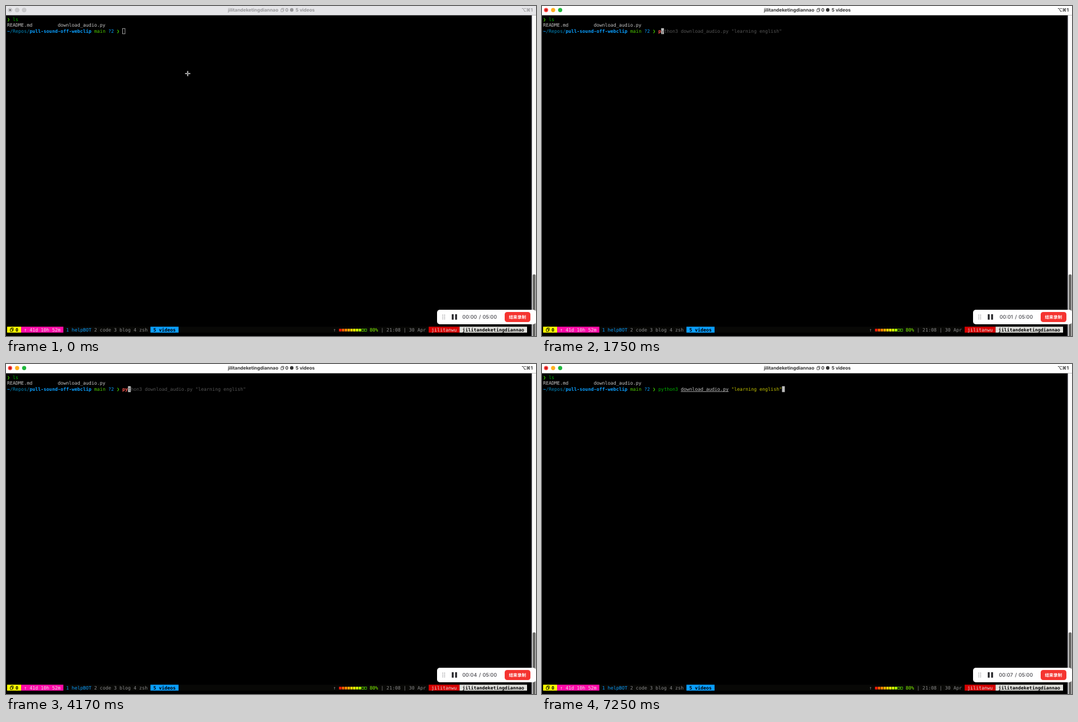
Write an HTML page that moves like this. It is 948 by 591 pixels and loops after 8 s.

```html
<!DOCTYPE html>
<html lang="en">
<head>
<meta charset="utf-8">
<title>Terminal recording</title>
<style>
  html, body { margin: 0; width: 100%; height: 100%; overflow: hidden; background: #000; }
  svg { display: block; width: 948px; height: 591px; }
  text { white-space: pre; text-rendering: geometricPrecision; }
  .mono { font: 8.35px "DejaVu Sans Mono", monospace; }
  .mono .bold { font-weight: 700; }
  .ui { font: 700 8.3px Inter, "DejaVu Sans", sans-serif; }
  .time { font: 500 9px Inter, sans-serif; fill: #46464c; }
  .cjk { font: 700 7.7px "Noto Sans CJK SC", "Noto Sans CJK", sans-serif; fill: #fff; }
</style>
</head>
<body>
<svg id="stage" viewBox="0 0 948 591"></svg>
<script>
const LOOP = 8000;
const LEFT = 2, TOP = 18.6, CELL_W = 5.027, CELL_H = 10.57;
const BAR_H = 16.6;
const STATUS_ROW = 52.58;
const HOST = "jilitandeketingdiannao";
const COMMAND = 'python3 download_audio.py "learning english"';
const PROMPT_COL = 41;
const BLUE = "#0a9fff", LIGHT = "#c7c7c7", GREY = "#8a8a8a", DIM = "#555", CURSOR = "#bbb";

const stage = document.getElementById("stage");

function add(parent, tag, attrs = {}, text) {
  const node = document.createElementNS("http://www.w3.org/2000/svg", tag);
  for (const key in attrs) node.setAttribute(key, attrs[key]);
  if (text !== undefined) node.textContent = text;
  parent.append(node);
  return node;
}
const group = (parent, attrs) => add(parent, "g", attrs);
const rect = (parent, x, y, width, height, fill, rx = 0) =>
  add(parent, "rect", { x, y, width, height, fill, rx });
const dot = (parent, cx, cy, r, fill) => add(parent, "circle", { cx, cy, r, fill });
const show = (node, on) => node.setAttribute("visibility", on ? "visible" : "hidden");

const colX = col => LEFT + col * CELL_W;
const rowY = row => TOP + row * CELL_H;

// Text on the terminal grid.
function run(parent, col, row, text, fill, bold = false) {
  return add(parent, "text", {
    x: colX(col), y: rowY(row) + 8.2, fill, class: bold ? "bold" : ""
  }, text);
}
function block(parent, col, row, cols, fill) {
  return rect(parent, colX(col), rowY(row), cols * CELL_W, CELL_H, fill);
}

function buildTitleBar(active) {
  const g = group(stage, { class: "ui" });
  const ink = active ? "#333" : "#98989a";
  const lights = active ? ["#ff3b38", "#ffb01f", "#1fb83c"] : ["#c9c9cb", "#c9c9cb", "#c9c9cb"];
  rect(g, 0, 0, 948, BAR_H, active ? "#fefefe" : "#e5e5e8");
  lights.forEach((fill, i) => {
    const light = dot(g, 7.3 + i * 12.6, 7.2, 3.7, fill);
    if (!active) {
      light.setAttribute("stroke", "#b8b8ba");
      light.setAttribute("stroke-width", .5);
    }
  });
  dot(g, 7.3, 7.2, 1.3, active ? "#7a0a08" : "#4a4a4c");
  const label = (x, text) => add(g, "text", { x, y: 10.1, fill: ink }, text);
  label(397, HOST);
  add(g, "path", {
    d: "M491.8 5.8h4v4.4h-4zM493 5.6v-1.4h4v4.4h-1",
    fill: "none", stroke: ink, "stroke-width": .8
  });
  label(499.5, "0");
  dot(g, 511, 7, 3.2, ink);
  label(518, "5 videos");
  add(g, "text", { x: 942, y: 10, fill: ink, "text-anchor": "end" }, "⌥⌘1");
  return g;
}

function buildTerminal(g) {
  run(g, 0, 0, "❯", "#46d800");
  run(g, 2, 0, "ls", "#00b300");
  run(g, 0, 1, "README.md", LIGHT);
  run(g, 18, 1, "download_audio.py", LIGHT);
  run(g, 0, 2, "~", BLUE, true);
  run(g, 1, 2, "/Repos/", "#0087bd");
  run(g, 8, 2, "pull-sound-off-webclip", BLUE, true);
  run(g, 31, 2, "main", "#4fcc00");
  run(g, 36, 2, "?2", BLUE);
  run(g, 39, 2, "❯", "#46d800");
}

function buildStatus(g) {
  const row = STATUS_ROW;
  const put = (col, text, fill, bold) => run(g, col, row, text, fill, bold);
  const fillCols = (col, cols, fill) => block(g, col, row, cols, fill);
  fillCols(0, 185, "#080806");

  fillCols(0, 5, "#ffff00");
  add(g, "path", {
    d: "M7.6 578.4h4v4.4h-4zM9 578v-1.4h4v4.4h-1",
    fill: "none", stroke: "#000", "stroke-width": .9
  });
  put(3, "0", "#000", true);
  fillCols(5, 15, "#ff0aa8");
  put(6, "↑ 41d 10h 52m", "#e4e4e4");
  put(21, "1 helpBOT", BLUE);
  put(31, "2 code 3 blog 4 zsh", GREY);
  fillCols(51, 10, BLUE);
  put(52, "5 videos", "#000", true);

  put(116, "↑", GREY);
  const ramp = ["#ff1a0a", "#ff5f00", "#ff8700", "#ffaf00", "#ffd700",
                "#ffff00", "#d7ff00", "#afff00", "#87ff00", "#5fff00"];
  ramp.forEach((color, i) => {
    const x = colX(118 + i) + .5;
    if (i < 8) rect(g, x, 578, 4.3, 4.8, color);
    else add(g, "rect", {
      x: x + .3, y: 578.4, width: 3.8, height: 4,
      fill: "none", stroke: color, "stroke-width": .7
    });
  });
  put(129, "80%", "#87ff00");
  put(133, "| 21:08 | 30 Apr", GREY);
  fillCols(150, 11, "#d70000");
  put(151, "jilitanwu", "#e4e4e4");
  fillCols(161, 24, "#e2e2de");
  put(162, HOST, "#000", true);
}

function buildScrollbar() {
  rect(stage, 940.5, BAR_H, 7.5, 591 - BAR_H, "#fafafa");
  rect(stage, 939.7, BAR_H, .8, 591 - BAR_H, "#5c5c6c");
  rect(stage, 942, 480.5, 5.2, 114, "#686866", 2.6);
}

function buildRecorder() {
  rect(stage, 771, 544, 177, 26, "#fff", 5);
  for (let i = 0; i < 8; i++)
    dot(stage, 781.4 + (i % 2) * 3.2, 553.4 + (i >> 1) * 2.4, .65, "#66666c");
  rect(stage, 797.4, 552, 3.3, 9.8, "#222226", .6);
  rect(stage, 803.4, 552, 3.3, 9.8, "#222226", .6);
  add(stage, "text", { x: 846, y: 560, class: "time" }, "/");
  add(stage, "text", { x: 878, y: 560, class: "time", "text-anchor": "end" }, "05:00");
  rect(stage, 892, 548, 46, 18, "#f53430", 4.5);
  add(stage, "text", { x: 914.8, y: 559.8, class: "cjk", "text-anchor": "middle" }, "结束录制");
  return add(stage, "text", { x: 842.3, y: 560, class: "time", "text-anchor": "end" });
}

function buildPointer(d) {
  const g = group(stage, { fill: "none" });
  add(g, "path", { d, stroke: "#ddd", "stroke-width": 2.2 });
  add(g, "path", { d, stroke: "#333", "stroke-width": .6 });
  return g;
}

// The command line with the first `typed` letters entered and the rest suggested.
function buildTyped(typed) {
  const g = group(terminal);
  const cursor = PROMPT_COL + typed;
  block(g, cursor, 2, 1, CURSOR);
  if (!typed) return g;
  run(g, PROMPT_COL, 2, COMMAND.slice(0, typed), "#ff5a52", true);
  run(g, cursor, 2, COMMAND.slice(typed), DIM);
  return g;
}

function buildAccepted() {
  const g = group(terminal);
  const [program, file] = COMMAND.split(" ");
  const fileCol = PROMPT_COL + program.length + 1;
  const textCol = fileCol + file.length + 1;
  run(g, PROMPT_COL, 2, program, "#00b300");
  run(g, fileCol, 2, file, LIGHT);
  rect(g, colX(fileCol), rowY(2) + 9.3, file.length * CELL_W, .8, LIGHT);
  run(g, textCol, 2, COMMAND.slice(textCol - PROMPT_COL), "#c2c200");
  block(g, PROMPT_COL + COMMAND.length, 2, 1, CURSOR);
  return g;
}

function buildHollow() {
  const g = group(terminal);
  add(g, "rect", {
    x: colX(PROMPT_COL) + .4, y: rowY(2) + .5, width: CELL_W - .6, height: CELL_H - 1,
    fill: "none", stroke: LIGHT, "stroke-width": .8
  });
  return g;
}

rect(stage, 0, 0, 948, 591, "#000");
const inactiveBar = buildTitleBar(false);
const activeBar = buildTitleBar(true);
const terminal = group(stage, { class: "mono" });
buildTerminal(terminal);
buildStatus(terminal);
const lines = {
  hollow: buildHollow(),
  empty: buildTyped(0),
  one: buildTyped(1),
  two: buildTyped(2),
  accepted: buildAccepted()
};
buildScrollbar();
const clock = buildRecorder();
const cross = buildPointer("M-4.6 0H4.6M0-4.6V4.6");
const beam = buildPointer("M-2.4-4.2Q0-4.2 0-2.8Q0-4.2 2.4-4.2M0-2.8V2.8M-2.4 4.2Q0 4.2 0 2.8Q0 4.2 2.4 4.2");
beam.setAttribute("transform", "translate(327.8 107)");

const lineTrack = [[0, "hollow"], [750, "empty"], [1750, "one"], [2250, "empty"],
                   [2670, "one"], [2830, "two"], [5830, "accepted"]];
const crossTrack = [[0, "325 121"], [330, "325.4 117"], [420, "326.4 110"], [500, "327 107"]];
const clockTrack = [0, 1170, 2250, 3170, 4170, 5170, 6170, 7250].map((at, i) => [at, i]);
const valueAt = (track, t) => track.filter(([at]) => t >= at).pop()[1];

function draw(t) {
  const focused = t >= 750;
  show(inactiveBar, !focused);
  show(activeBar, focused);
  show(cross, !focused);
  show(beam, focused && t < 1750);
  cross.setAttribute("transform", `translate(${valueAt(crossTrack, t)})`);
  const line = valueAt(lineTrack, t);
  for (const name in lines) show(lines[name], name === line);
  clock.textContent = "00:0" + valueAt(clockTrack, t);
}

const start = performance.now();
function tick() {
  draw((performance.now() - start) % LOOP);
  requestAnimationFrame(tick);
}
tick();
</script>
</body>
</html>
```
